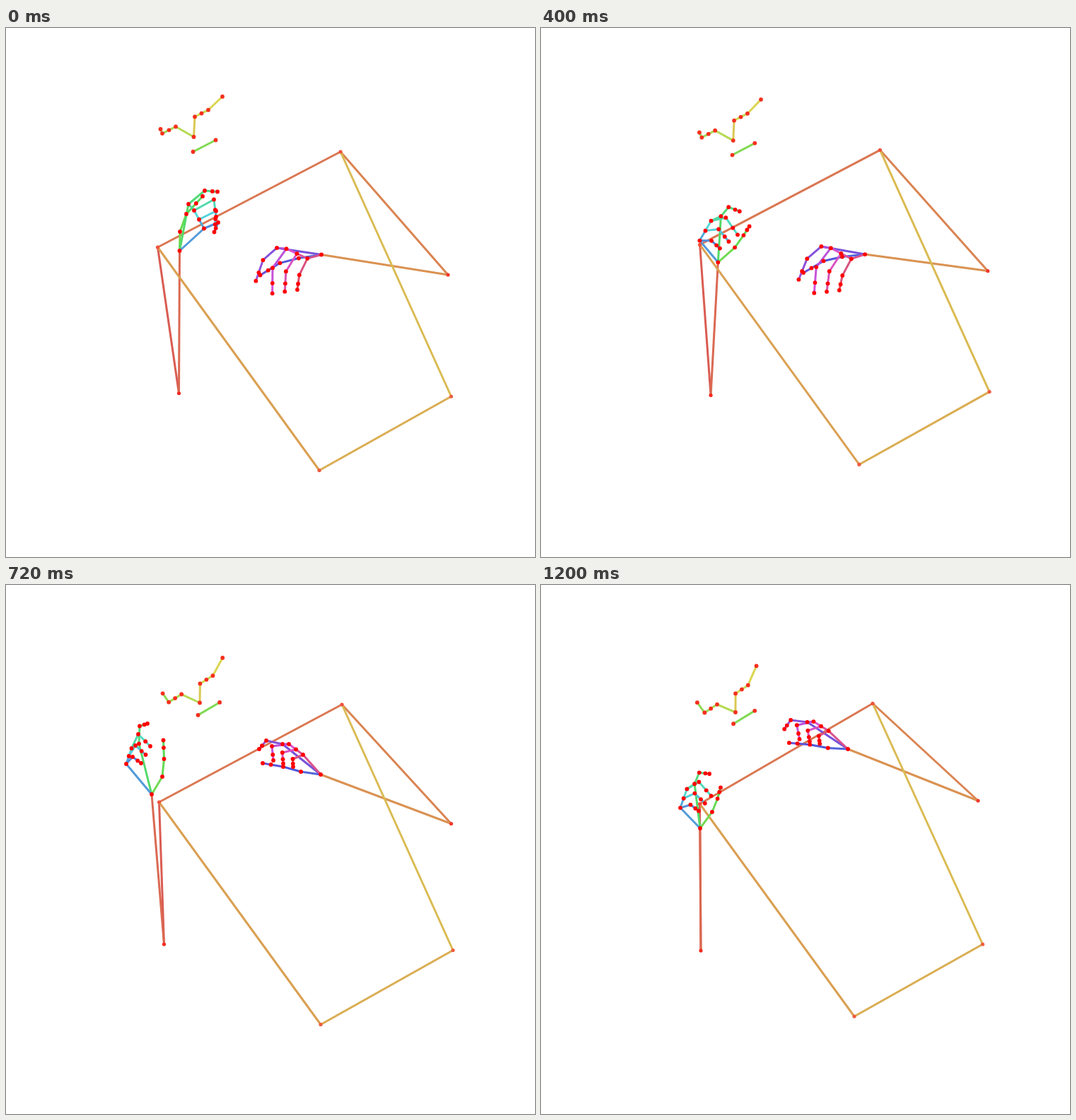
An HTML page with a canvas for the animation above (1.28 s loop, 748x748 px).

```html
<!DOCTYPE html>
<html>
<head>
<meta charset="utf-8">
<style>
html, body { margin: 0; width: 100%; height: 100%; overflow: hidden; background: #fff; }
canvas { display: block; }
</style>
</head>
<body>
<canvas id="stage" width="748" height="748"></canvas>
<script>
const LOOP = 1280, STEP = 80;
const ctx = document.getElementById('stage').getContext('2d');
const mix = (p, q, u) => p.map((v, i) => v + (q[i] - v) * u);
const add = (p, q) => p.map((v, i) => v + q[i]);

// Key times and where the main joints pass at each of them
const times = [0, 240, 480, 720, 880, 1040, 1200];
const body = [
  [[214.5,310], [225.5,308], [223,306], [216.5,307], [221.5,305], [224.5,306.5], [224.5,309.5]], // shoulders, elbows
  [[244.5,516.5], [244,522], [237,517], [223.5,508], [205.5,496], [204,500], [226,517]],
  [[473,175], [478.5,174.5], [479,171.5], [475,169], [476,167], [474.5,166.5], [469,167.5]],
  [[625,349], [631,344], [631.5,343], [629.5,337.5], [625,317.5], [621,302.5], [618,305]],
  [[443,625.5], [449,616], [449.5,618.5], [445,621.5], [447,617], [447,614], [443,610]], // hips
  [[629.5,521], [632,514], [634.5,515], [632,516.5], [633,513], [631.5,511], [624.5,508]]
];
const nose = [[265.5,154], [271,158], [272,160], [274,166.5], [279,173.5], [280,177], [275,180]];
const turn = [0, -.1, .25, .72, 1, 1, .95];
const wrists = [
  [[245.5,315], [260.5,348], [241.5,320], [206,296], [187,279.5], [191.5,295], [225,344]],
  [[446,320.5], [462.5,318], [454.5,316], [445,268], [431.5,222], [430,203], [434,232]]
];

// From the nose: eye, other eye, eye spacing, ears, mouth corners
const away = [[1.5,-28.5], [-25.5,-14.5], [9.5,-4.8], [40.5,-57], [-47,-11], [31,4.5], [-1,21]];
const low = [[0,-26.5], [-26,-11], [8.8,-5.9], [29,-66], [-54.5,-14], [27,-2.5], [-3,16]];

// From the wrist: knuckle, bend and tip of thumb, index, middle and little finger
const reach = [.5,-27, 9.5,-52, 32.5,-77, 12.5,-66, 35.5,-85, 53.5,-83.5, 20.5,-57, 48.5,-72.5, 51.5,-48, 34.5,-31.5, 54.5,-40, 49,-26.5];
const fan = [24.5,-20, 37.5,-36, 48,-45, 7.5,-60, 20.5,-69, 36.5,-61, -6.5,-52, 15.5,-53, 33.5,-29, -22.5,-23.5, -5.5,-20, 6.5,-10];
const open = [21.5,-22, 32.5,-41, 39.5,-57, 1,-68, 10.5,-84, 25.5,-80, -11.5,-62, 8,-70, 23.5,-46.5, -25.5,-35, -9.5,-37.5, 1.5,-26.5];
const tall = [15,-25, 17.5,-50, 16.5,-76.5, -18,-71.5, -17,-96.5, -6,-100, -28.5,-65, -19,-85, -2,-68, -36,-43, -27,-53, -15,-44];
const lift = [16,-22, 21,-43.5, 19,-64.5, -10.5,-65.5, -8.5,-86, -1,-84, -22,-60.5, -16,-76.5, -10.5,-59.5, -35,-39.5, -30.5,-47, -27,-40];
const hang = [-31.5,3, -57.5,8, -85.5,23, -60.5,-13, -80.5,2.5, -92,30.5, -47.5,-11, -68,14, -70.5,49, -19.5,4, -32,26, -36,46];
const curl = [-28,-4, -53,-11, -82,-16, -54,-43, -77,-48, -87,-36, -45,-43, -69,-40, -67,-20, -25,-28, -39.5,-22, -39,-11];
const raised = [-26,-1.5, -49.5,-11, -74.5,-20, -61.5,-55.5, -71.5,-58, -74.5,-52, -43.5,-51, -57.5,-47, -50.5,-42, -22.5,-42, -32.5,-43, -23.5,-37];

// Shape, degrees turned and size at each key time
const grips = [
  [[reach], [fan], [open], [tall], [lift, -2.5], [lift, 2.5], [open, -8, .93]],
  [[hang, -3.5, 1.03], [hang], [hang, 0, 1.02], [curl], [raised], [raised, 3, 1.06], [curl, -5]]
];

function face(k) {
  const [eyeA, eyeB, gap, earA, earB, ...mouth] = away.map((p, i) => mix(p, low[i], turn[k]));
  const eye = (p, dir) => [0, 1, 2].map(n => add(p, gap.map(v => v * n * dir)));
  return [[0, 0], ...eye(eyeA, 1), earA, ...eye(eyeB, -1), earB, ...mouth].map(p => add(nose[k], p));
}

function hand(side, k) {
  const [shape, degrees = 0, size = 1] = grips[side][k];
  const angle = degrees * Math.PI / 180, c = size * Math.cos(angle), s = size * Math.sin(angle);
  const [x, y] = wrists[side][k], points = [];
  for (let i = 0; i < shape.length; i += 2) {
    const [a, b] = [shape[i], shape[i + 1]];
    points.push([x + a * c - b * s, y + a * s + b * c]);
  }
  const [thumb, index, middle, little] = [0, 3, 6, 9].map(i => points.slice(i, i + 3));
  const ring = middle.map((p, i) => mix(p, little[i], .5));
  const digits = [thumb, index, middle, ring, little];
  return [[x, y], ...digits.flatMap(([base, bend, tip]) => [base, bend, mix(bend, tip, .6), tip])];
}

const poses = times.map((_, k) =>
  [...body.map(path => path[k]), ...face(k), ...hand(0, k), ...hand(1, k)]);

// Joint numbering: body 0-5, face 6-16, hands from 17 and 38
const HEAD = 6, HANDS = [17, 38];
const shift = (list, by) => list.map(pair => pair.map(n => n + by));
const finger = n => [[n, n + 1], [n + 1, n + 2], [n + 2, n + 3]];
const handBones = [[0, 1], ...finger(1), [0, 5], ...finger(5), [5, 9], ...finger(9),
  [9, 13], ...finger(13), [13, 17], [0, 17], ...finger(17)];
const bones = [
  [0, 1], [1, HANDS[0]], [0, 2], [2, 3], [3, HANDS[1]], [0, 4], [4, 5], [2, 5],
  ...shift([[0, 1], [3, 4], [1, 2], [2, 3], [0, 5], [5, 6], [6, 7], [7, 8], [9, 10]], HEAD),
  ...HANDS.flatMap(n => shift(handBones, n))
];
const bodyDots = ['#f0503c', '#f32a20', '#f0503c', '#f3382a', '#ee5c40', '#ee5c40'];

function slope(k, n, axis) {
  const a = Math.max(k - 1, 0), b = Math.min(k + 1, times.length - 1);
  return (poses[b][n][axis] - poses[a][n][axis]) / (times[b] - times[a]);
}

// Smooth curve through the key poses
function joints(t) {
  let k = 0;
  while (k < times.length - 2 && t >= times[k + 1]) k++;
  const span = times[k + 1] - times[k];
  const u = (t - times[k]) / span, v = 1 - u;
  return poses[k].map((p, n) => mix(p, poses[k + 1][n], u * u * (3 - 2 * u)).map((value, axis) =>
    value + span * u * v * (slope(k, n, axis) * v - slope(k + 1, n, axis) * u)));
}

function draw(now) {
  const at = joints(Math.floor(now % LOOP / STEP) * STEP);
  ctx.fillStyle = '#fff';
  ctx.fillRect(0, 0, 748, 748);
  ctx.lineWidth = 3;
  bones.forEach(([a, b], i) => {
    ctx.strokeStyle = `hsl(${4 + i * 6}, 65%, 59%)`;
    ctx.beginPath();
    ctx.moveTo(...at[a]);
    ctx.lineTo(...at[b]);
    ctx.stroke();
  });
  at.forEach((p, n) => {
    ctx.fillStyle = bodyDots[n] || (n < HANDS[0] ? '#f5301e' : '#f00');
    ctx.beginPath();
    ctx.arc(...p, n < HEAD ? 2.6 : 2.9, 0, 7);
    ctx.fill();
  });
}

let start;
function tick(now) {
  start ??= now;
  draw(now - start);
  requestAnimationFrame(tick);
}
draw(0);
requestAnimationFrame(tick);
</script>
</body>
</html>
```
